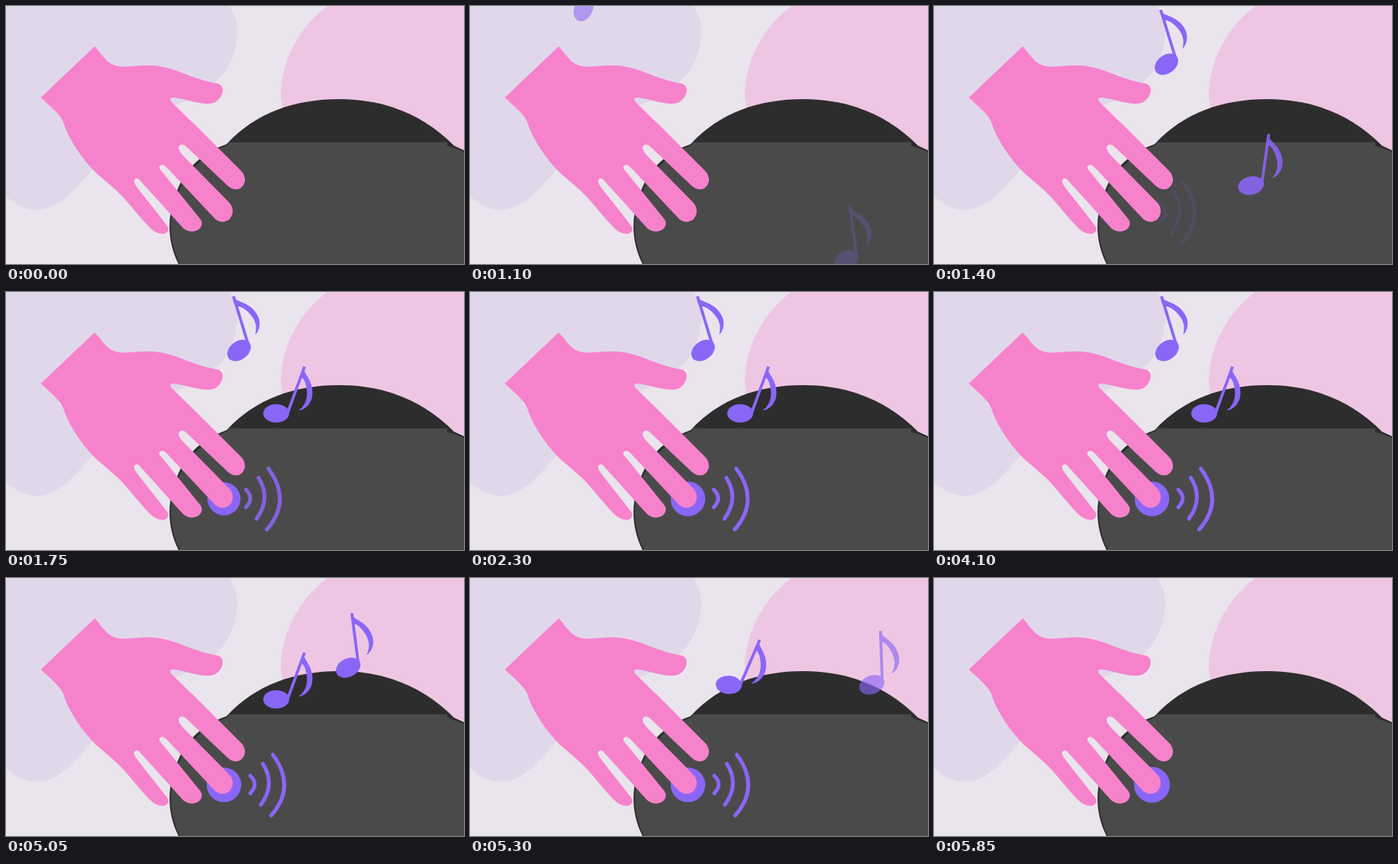
Animation of 600 by 338 pixels, one loop 5900 ms. Source, as an HTML page:

```html
<!DOCTYPE html>
<html lang="en">
<head>
<meta charset="utf-8">
<title>Touch and sound</title>
<style>
  html, body { margin: 0; width: 100%; height: 100%; overflow: hidden; background: #eae4ec; }
  svg { display: block; width: 100%; height: 100%; }
</style>
</head>
<body>
<svg viewBox="0 0 600 338">
  <defs>
    <g id="note" fill="#8a66f6">
      <ellipse rx="17" ry="12" transform="rotate(-37)"/>
      <path d="M-7.300 -71L12.600 -6" stroke="#8a66f6" stroke-width="3.800"/>
      <path d="M-8.500 -72.500C-6 -66 -1 -65 4 -63C18 -58 27 -46 27 -36C27 -29 25 -24 21 -20.500C25 -33 20 -45 6 -55C3 -57 -1 -58 -4 -58Z"/>
    </g>
  </defs>
  <rect width="600" height="338" fill="#eae4ec"/>
  <path fill="#e0d8ea" d="M0 0H293C300 11 303 22 303 32C302 76 280 109 222 130C170 148 148 180 115 212C90 240 70 267 40 267C25 267 12 260 0 249Z"/>
  <path fill="#eec6e3" d="M421 0C383 28 359 75 360 120L365 150L600 195V0Z"/>
  <path fill="#2d2d2d" d="M226 338C212 310 211 280 220 255C229 219 252 194 289 181C327 139.500 379 122 436.500 122S546 141 587 183L600 189V338Z"/>
  <path fill="#4a4a4a" d="M228 338C214 310 213 280 222 255C231 222 254 197 291 182V178.500H578V183L600 191V338Z"/>
  <circle id="dot" cx="285.500" cy="271" fill="#8a66f6"/>
  <g id="waves" fill="none" stroke="#8a66f6" stroke-width="5" stroke-linecap="round">
    <path d="M320 259Q331.500 270 320 282"/>
    <path d="M336.500 243.500Q353.500 270 334 297"/>
    <path d="M349.500 231.500Q380.500 273 347.500 311"/>
  </g>
  <path fill="#f682cc" d="M116 53C127 63 131 79 154 79.500C172 79 190 75 211 81C233 87 250 97 275 101C282 102 285 107 283.500 113C281 122 275 128 264 128C246 127 232 121 220 120C215 119.500 214 122 217 126L251 159L308 216C314 222 315 231 309 237C304 242 297 241 291 236L238 186C234 181 229 180 226.500 184C225 187 228 191 231 195L292 257C298 263 299 272 293 279C287 284 280 284 274 279L212 213C208 208 204 207 201 210C200 213 203 215 206 219L252 276C258 282 258 288 252 293C246 297 238 296 232 291L176 229C173 225 170 225 168 228C167 231 170 235 172 238L209 285C215 292 213 297 206 298.500C199 299 193 295 188 290C172 274 161 257 144 241L118.500 219C100 201 85 178 77 158C74 146 69 141 45.500 120Z"/>
  <use href="#note" id="left"/>
  <use href="#note" id="right"/>
</svg>
<script>
const LOOP = 5900;
const get = id => document.getElementById(id);
const clamp = v => Math.min(1, Math.max(0, v));
const span = (t, a, b) => clamp((t - a) / (b - a));
const inOut = p => (1 - Math.cos(Math.PI * p)) / 2;
const sineOut = p => Math.sin(Math.PI * p / 2);

// from / to: x, y and turn relative to the resting pose
const notes = [
  { el: get('left'), rest: [305.3, 76.6, 0], from: [-215, -100, -40], to: [273, 78, 18.5],
    enter: [930, 1420], leave: [4700, 5700], exitEase: sineOut },
  { el: get('right'), rest: [354, 159, 37.1], from: [146, 182, -29], to: [-98, -124, 22],
    enter: [1000, 1727], leave: [5150, 5740], exitEase: inOut }
];

function drawNote(n, t) {
  const p = span(t, ...n.enter), q = span(t, ...n.leave);
  const a = 1 - inOut(p), b = n.exitEase(q);
  const [x, y, turn] = n.rest.map((v, i) => v + n.from[i] * a + n.to[i] * b);
  n.el.setAttribute('transform', `translate(${x} ${y}) rotate(${turn})`);
  n.el.setAttribute('opacity', Math.min(clamp(p * 1.6), clamp((1 - q) * 1.6)));
}

function draw(now) {
  const t = now % LOOP;
  notes.forEach(n => drawNote(n, t));

  const slide = t < 1300 ? -34 : -23 * Math.exp((1400 - t) / 252);
  get('waves').setAttribute('transform', `translate(${slide})`);
  get('waves').setAttribute('opacity', span(t, 1350, 1800) * (1 - span(t, 5350, 5700)));

  const grow = t < 1500 ? 0 : 1 - Math.exp((1500 - t) / 80);
  get('dot').setAttribute('r', 22.7 * grow + 0.8 * span(t, 5600, 5850));
  requestAnimationFrame(draw);
}
draw(performance.now());
</script>
</body>
</html>
```
